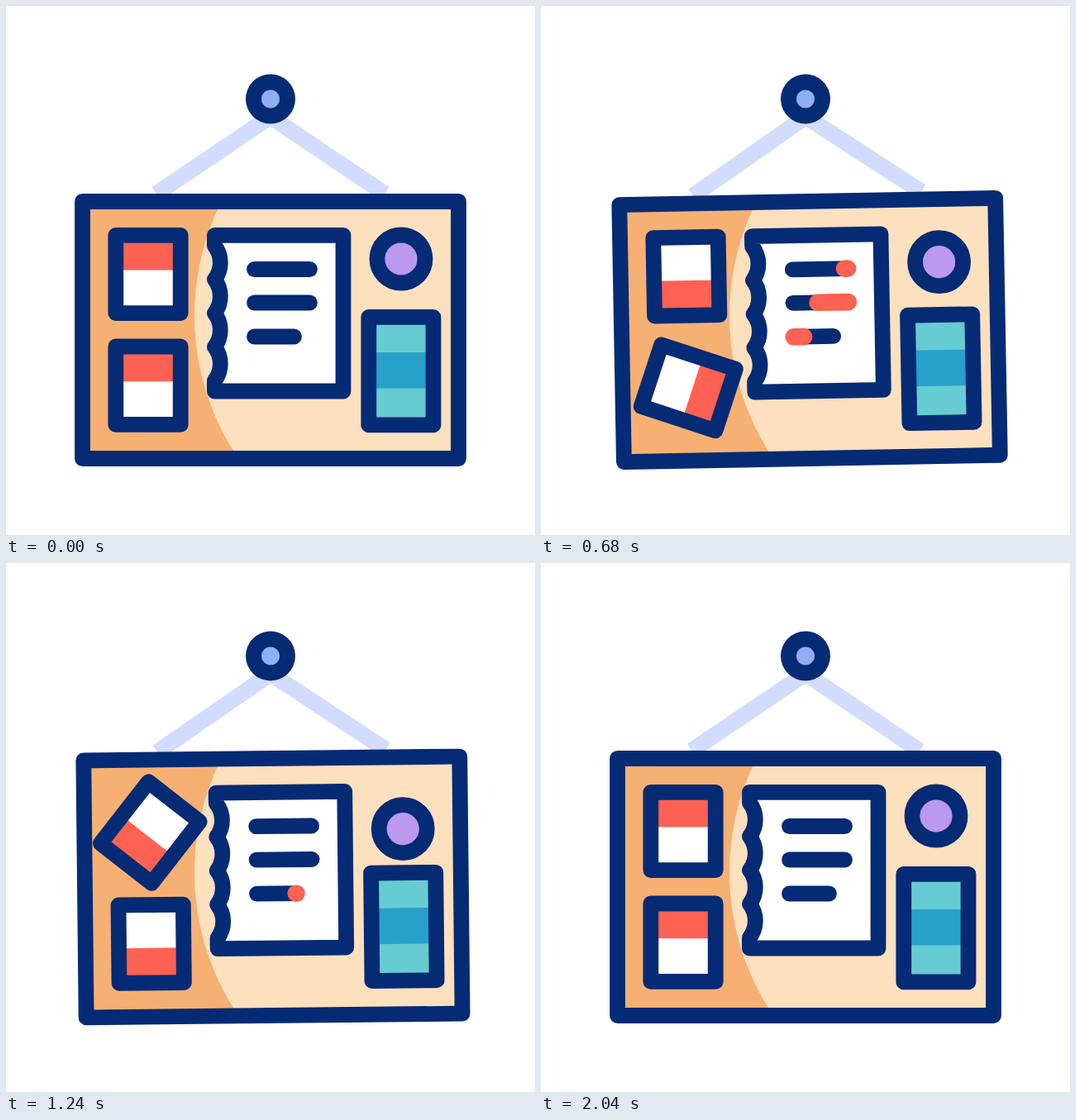
Write an HTML page that moves like this. It is 640 by 640 pixels and loops after 2280 ms.

```html
<!DOCTYPE html>
<html lang="en">
<head>
<meta charset="utf-8">
<title>Notice board</title>
<style>
html, body { margin: 0; width: 100%; height: 100%; overflow: hidden; background: #fff; }
svg { display: block; width: 100%; height: 100%; }
.ink { stroke: #052b75; stroke-width: 18.8; stroke-linecap: round; stroke-linejoin: round; }
.mark { stroke: #ff6152; stroke-width: 20.6; stroke-linecap: round; }
</style>
</head>
<body>
<svg viewBox="0 0 640 640">
  <defs>
    <clipPath id="inside"><rect x="92.5" y="236.5" width="455" height="311"/></clipPath>
    <g id="card">
      <rect x="-39" y="-47" width="78" height="94" fill="#fff"/>
      <rect x="-39" y="-47" width="78" height="42" fill="#ff6152"/>
      <rect class="ink" x="-39.2" y="-47.2" width="78.4" height="94.4" fill="none"/>
    </g>
  </defs>
  <g id="board">
    <path d="M182 227L320 134L458 227" fill="none" stroke="#d2dcff" stroke-width="19.5"/>
    <g clip-path="url(#inside)">
      <rect x="92" y="236" width="456" height="312" fill="#f6b073"/>
      <circle id="light" cx="536" cy="374.5" r="308" fill="#fde0be"/>
    </g>
    <rect class="ink" x="92.5" y="236.5" width="455" height="311" fill="none"/>
    <path id="paper" class="ink" fill="#fff"/>
    <g id="lines"></g>
    <use id="upper" href="#card"/>
    <use id="lower" href="#card"/>
    <rect x="439" y="376" width="78" height="131" fill="#67cbd2"/>
    <rect x="439" y="419" width="78" height="43.5" fill="#28a0cc"/>
    <rect class="ink" x="438.8" y="376.4" width="78.2" height="130.5" fill="none"/>
    <circle id="ball" class="ink" cx="478" r="29" fill="#bb99ef"/>
    <circle cx="320" cy="112.5" r="30" fill="#052b75"/>
    <circle cx="320" cy="112.5" r="11" fill="#92aef4"/>
  </g>
</svg>
<script>
const LOOP = 2280, STEP = 40;
const el = id => document.getElementById(id);
const place = (id, value) => el(id).setAttribute('transform', value);

const ease = (t, from, to) => {
  const u = Math.min(1, Math.max(0, (t - from) / (to - from)));
  return u * u * (3 - 2 * u);
};

// Eased value through [time, value] keys
const follow = (t, keys) => keys.slice(1).reduce(
  (value, [time, next], i) => value + (next - keys[i][1]) * ease(t, keys[i][0], time),
  keys[0][1]);

const SWING = [[0, 0], [280, 3], [560, -3], [840, 2], [1120, -1], [1400, 0]];
const BOUNCE = [[40, 0], [315, 28], [605, 0], [800, 20], [1040, 0], [1385, 28], [1740, 0]];
const UPPER = [[40, 0], [600, 180], [1040, 180], [1710, 360]];
const LOWER = [[360, 0], [920, 180], [1360, 180], [2030, 360]];

const TEXT = [
  { y: 318.5, length: 67, delay: 0 },
  { y: 359, length: 67, delay: 200 },
  { y: 400, length: 48, delay: 520 }
];
const LEFT = 300.5;

function addLine(name, y, length) {
  const line = document.createElementNS('http://www.w3.org/2000/svg', 'line');
  line.setAttribute('class', name);
  line.setAttribute('x1', LEFT);
  line.setAttribute('x2', LEFT + length);
  line.setAttribute('y1', y);
  line.setAttribute('y2', y);
  el('lines').append(line);
  return line;
}

for (const row of TEXT) {
  addLine('ink', row.y, row.length);
  row.mark = addLine('mark', row.y, row.length);
}

const scallops = 'a33.5 33.5 0 0 1 0 40.8'.repeat(4);
el('paper').setAttribute('d', `M252.4 277.4V290${scallops}V466H408V277.4Z`);

function draw(t) {
  const angle = follow(t, SWING);
  place('board', `rotate(${angle} 320 112)`);
  place('light', `rotate(${-angle} 320 112)`);
  place('upper', `translate(172 324.5) rotate(${follow(t, UPPER)})`);
  place('lower', `translate(172 459.2) rotate(${follow(t, LOWER)})`);
  el('ball').setAttribute('cy', 306 + follow(t, BOUNCE));

  for (const { mark, length, delay } of TEXT) {
    const start = ease(t - delay, 240, 760);
    const end = ease(t - delay, 0, 480);
    mark.setAttribute('x1', LEFT + length * start);
    mark.setAttribute('x2', LEFT + length * end);
    mark.setAttribute('visibility', end > 0 && start < 1 ? 'visible' : 'hidden');
  }
}

const begin = performance.now();
function tick() {
  const t = (performance.now() - begin) % LOOP;
  draw(Math.floor(t / STEP) * STEP);
  requestAnimationFrame(tick);
}
tick();
</script>
</body>
</html>
```
